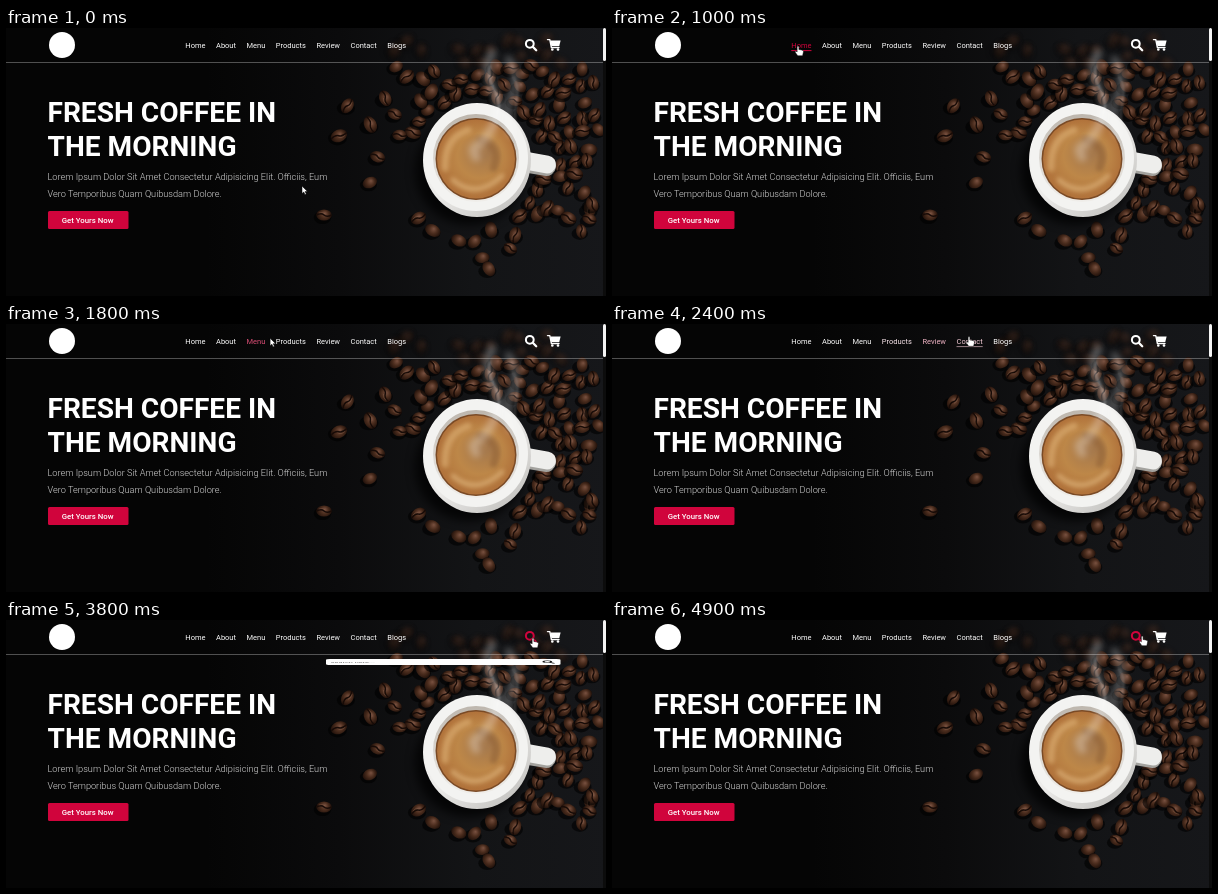
These frames come from a looping animation (600 by 268 pixels, 5 s). An HTML page with a canvas:

```html
<!DOCTYPE html>
<html lang="en">
<head>
<meta charset="utf-8">
<title>Coffee shop</title>
<style>
html, body { margin: 0; width: 100%; height: 100%; overflow: hidden; background: #040404; }
canvas, svg { position: absolute; left: 0; top: 0; width: 600px; height: 268px; }
text { font-family: Roboto, sans-serif; fill: #fff; }
#links text { font-size: 7.5px; }
.title { font-size: 28.1px; font-weight: 700; }
.lead { font-size: 9.2px; font-weight: 300; fill: #d6d6d6; }
.button { font-size: 7.8px; font-weight: 500; }
.hint { font-size: 7.4px; fill: #666; }
</style>
</head>
<body>
<canvas id="photo" width="600" height="268"></canvas>
<svg viewBox="0 0 600 268">
  <defs>
    <g id="lens">
      <circle cx="-1.2" cy="-1.2" r="3.9" fill="none" stroke-width="2"/>
      <path d="M1.8 1.8L5.2 5.2" stroke-width="2.3" stroke-linecap="round"/>
    </g>
  </defs>
  <path d="M0 34.5H597" stroke="#fff" stroke-opacity=".3"/>
  <circle cx="56" cy="17" r="13" fill="#fff"/>
  <g id="links"></g>
  <use id="find" href="#lens" x="525" y="17"/>
  <g fill="#fff">
    <path d="M541.5 11.6h2.3l1.6 7.9h7.6" fill="none" stroke="#fff" stroke-width="1.4" stroke-linejoin="round" stroke-linecap="round"/>
    <path d="M544.3 12.4h10.3l-1.3 5.6h-8z"/>
    <circle cx="546.3" cy="21.5" r="1.3"/><circle cx="552" cy="21.5" r="1.3"/>
  </g>
  <text class="title" x="41.5" y="94">FRESH COFFEE IN</text>
  <text class="title" x="41.5" y="128">THE MORNING</text>
  <text class="lead" x="41.5" y="151.5">Lorem Ipsum Dolor Sit Amet Consectetur Adipisicing Elit. Officiis, Eum</text>
  <text class="lead" x="41.5" y="168.5">Vero Temporibus Quam Quibusdam Dolore.</text>
  <rect x="42" y="183" width="80.5" height="18" rx="1.5" fill="#d0043c"/>
  <text class="button" x="55.7" y="195">Get Yours Now</text>
  <g id="search">
    <rect width="234.5" height="23.5" rx="4" fill="#fff"/>
    <text class="hint" x="4.8" y="14.6">search here...</text>
    <use href="#lens" x="222.5" y="11.8" stroke="#111"/>
  </g>
  <rect x="597" width="3" height="268" fill="#0c0c0c"/>
  <rect x="597" width="3" height="33" rx="1.5" fill="#f4f4f4"/>
  <g id="cursor" fill="#fff" stroke="#000" stroke-width=".5" stroke-linejoin="round">
    <path id="arrow" d="M0 0V7.6L1.8 6L3 8.7L4.3 8.1L3.1 5.5H5.5Z"/>
    <path id="hand" d="M-.9 .6Q0 -.6 .9 .6V3.5L2.3 3.7L3.6 4L5 4.5Q5.6 4.9 5.5 5.8L4.6 9.8H-.3L-2.8 6.2Q-3.1 4.9 -1.9 5.1L-.9 6Z"/>
  </g>
</svg>
<script>
const $ = id => document.getElementById(id);
const ctx = $('photo').getContext('2d');
const clamp = v => Math.min(1, Math.max(0, v));

let seed = 11;
const random = () => (seed = seed * 16807 % 2147483647) / 2147483647;

function oval(x, y, rx, ry, fill, turn = 0) {
  ctx.beginPath();
  ctx.ellipse(x, y, rx, ry, turn, 0, 7);
  ctx.fillStyle = fill;
  ctx.fill();
}
function gradient(g, ...colors) {
  colors.forEach((c, i) => g.addColorStop(i / (colors.length - 1), c));
  return g;
}
function curve(path, color, width) {
  ctx.strokeStyle = color;
  ctx.lineWidth = width;
  ctx.stroke(new Path2D(path));
}

function bean(x, y) {
  const turn = random() * 6.3, size = 7 + random() * 1.6;
  ctx.save();
  if (y < 36) { // out of focus behind the header
    ctx.filter = 'blur(2px)';
    ctx.globalAlpha = .35;
  }
  ctx.translate(x, y);
  oval(-1.5, 2.5, size + 1, size * .85, '#0009');
  ctx.rotate(turn);
  oval(0, 0, size, size * .72, gradient(
    ctx.createRadialGradient(2 * Math.cos(turn + 1), -2 * Math.sin(turn + 1), 0, 0, 0, size),
    '#795140', '#4a2c1d', '#1f100a'));
  if (random() < .65) {
    curve(`M${-size} 0Q${-size / 3} -2.5 0 0T${size} 0`, '#170b07', 1.4);
    curve(`M${-size * .7} -2Q-2 -3.5 1 -1.4`, '#a0776055', .8);
  }
  ctx.restore();
}

// rings of beans around the cup, dense above it and sparse below
function scatter(cx, cy) {
  for (let r = 69; r < 150; r += 14) {
    for (let a = random(); a < 7; a += 15 / r) {
      const x = cx + r * Math.cos(a) + random() * 6 - 3;
      const y = cy + r * Math.sin(a) + random() * 6 - 3;
      const density = Math.max(.25, .55 + .45 * Math.cos(a + 1.2)) - (r - 69) / 260;
      if (random() < density && x < 594 && y > 8 && y < 256) bean(x, y);
    }
  }
}

function drawPhoto() {
  ctx.fillStyle = gradient(ctx.createLinearGradient(200, 0, 600, 0), '#050505', '#0b0b0c', '#131416', '#16171a');
  ctx.fillRect(0, 0, 600, 268);
  bean(318, 187);
  scatter(471, 132);

  // cup
  ctx.filter = 'blur(5px)';
  oval(464, 143, 55, 54, '#000b');
  ctx.filter = 'none';
  ctx.lineCap = 'round';
  curve('M516 134L540 138', '#a3a29e', 20);
  curve('M516 132L541 136.5', '#eeeeec', 18);
  oval(471, 132, 54, 57, gradient(ctx.createLinearGradient(430, 90, 510, 180), '#f7f7f5', '#ecebe9', '#c4c3c0'));
  oval(470, 130, 52, 53, '#f3f3f1');
  oval(470, 130, 43, 44, gradient(ctx.createLinearGradient(0, 86, 0, 174), '#bdb6ad', '#d9d5cf', '#f0eeea'));
  oval(470, 131, 40.5, 41, '#7a4a25');
  oval(470, 131, 39, 39.5, gradient(ctx.createRadialGradient(478, 124, 5, 470, 131, 40), '#a77a4d', '#bd8748', '#b0713a'));
  ctx.filter = 'blur(2px)';
  curve('M439 140Q438 110 462 102', '#dcae73aa', 7);
  curve('M447 152Q470 172 496 148', '#dfb47baa', 5);
  curve('M474 112Q496 118 488 140', '#8a5d3688', 8);

  // steam
  ctx.filter = 'blur(3px)';
  curve('M486 25C470 55 503 65 488 96S462 113 470 129', '#ffffff48', 9);
  curve('M503 32C523 62 490 72 506 106', '#ffffff40', 8);
  ctx.filter = 'blur(1px)';
  curve('M484 38C478 57 499 65 491 86', '#ffffff50', 1.5);
  curve('M507 48C518 68 505 80 510 99', '#ffffff40', 1.3);
  ctx.filter = 'none';
}
drawPhoto();

let nextX = 179.3;
const links = ['Home', 'About', 'Menu', 'Products', 'Review', 'Contact', 'Blogs'].map(name => {
  $('links').insertAdjacentHTML('beforeend', `<g><text x="${nextX}" y="19.6">${name}</text><path/></g>`);
  const [label, line] = $('links').lastChild.children;
  const left = nextX, right = left + label.getComputedTextLength();
  line.setAttribute('d', `M${left} 22.6H${right}`);
  nextX = right + 10.5;
  return { label, line, left, right };
});

// pointer stops: time, x, y
const route = [[0, 296, 158], [600, 184, 18.5], [1000, 186, 18], [1300, 222, 15.5], [2250, 302, 13],
  [2400, 357, 12.5], [3000, 408, 15], [3600, 527, 18], [4500, 527, 18], [5000, 531, 15.5]];

function pointer(t) {
  const i = route.findIndex(stop => stop[0] > t), a = route[i - 1], b = route[i];
  const p = (t - a[0]) / (b[0] - a[0]);
  return [1, 2].map(j => a[j] + (b[j] - a[j]) * p);
}
function over(t, { left, right }) {
  const [x, y] = pointer(Math.max(0, t));
  return x >= left && x <= right && y < 20;
}
// share of the last 200 ms spent over a target, as in a 0.2 s linear transition
function glow(t, target) {
  let n = 0;
  for (let s = 0; s < 200; s += 20) n += over(t - s, target);
  return n / 10;
}
const tint = k => `rgb(${255 - 47 * k},${255 - 251 * k},${255 - 195 * k})`;
const finder = { left: 518, right: 532 };

function draw() {
  const t = Math.floor(performance.now() % 5000 / 100) * 100;
  const pointing = [finder, ...links].some(target => over(t, target));
  for (const link of links) {
    const k = glow(t, link);
    link.label.style.fill = tint(k);
    link.line.setAttribute('stroke', tint(k));
    link.line.setAttribute('opacity', over(t, link) ? clamp(k * 3) : 0);
  }
  const open = clamp((t - 3750) / 200) * clamp((4900 - t) / 200);
  $('find').setAttribute('stroke', tint(glow(t, finder)));
  $('search').setAttribute('transform', `translate(320 39) scale(1 ${open})`);
  $('cursor').setAttribute('transform', `translate(${pointer(t)})`);
  $('hand').style.display = pointing ? '' : 'none';
  $('arrow').style.display = pointing ? 'none' : '';
  requestAnimationFrame(draw);
}
draw();
</script>
</body>
</html>
```
